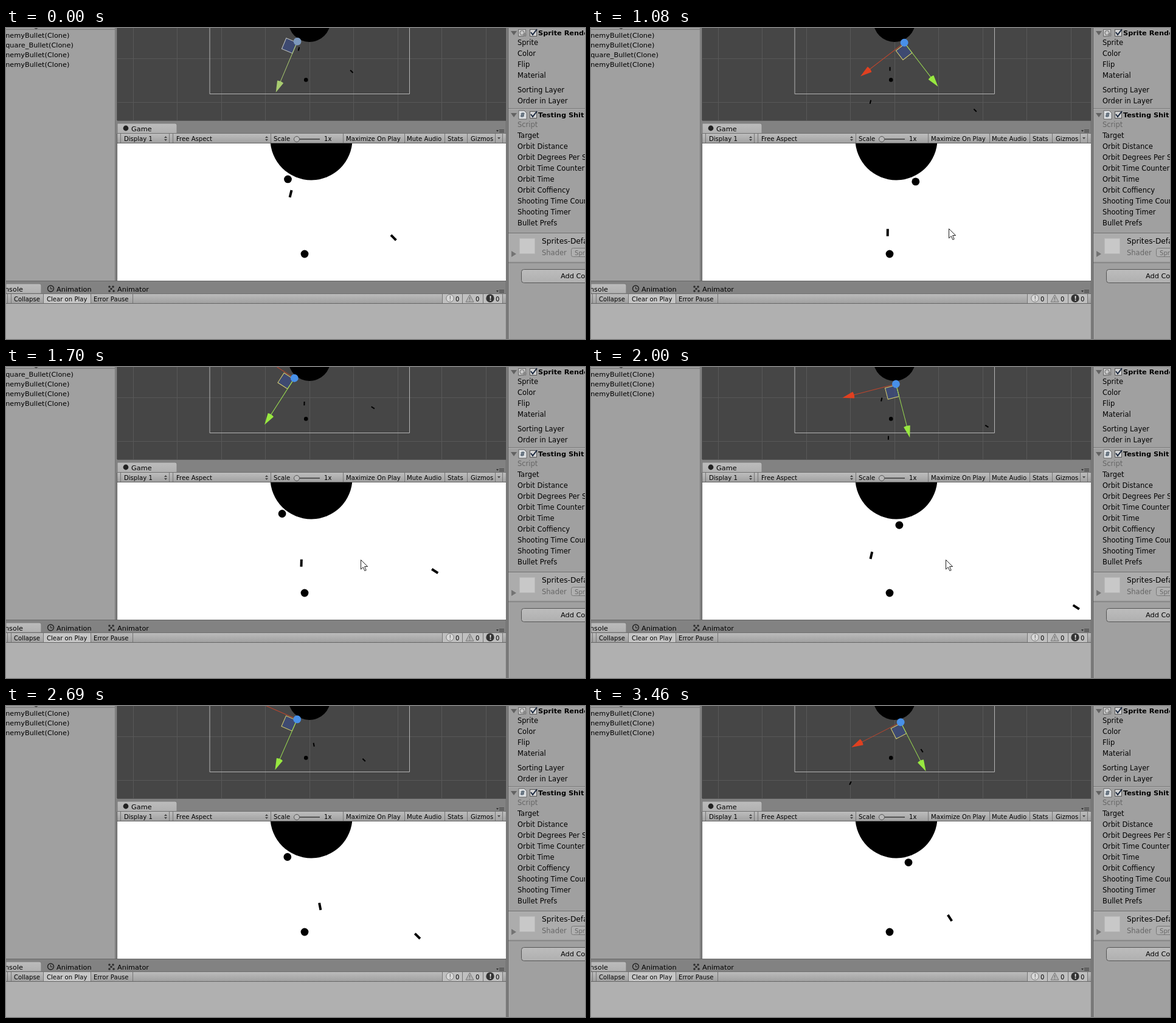
Recreate the animation shown at these times as an HTML page. Size 952 by 512 pixels, loop 3.54 s.

```html
<!DOCTYPE html>
<html lang="en">
<head>
<meta charset="utf-8">
<title>Orbit shooter in the editor</title>
<style>
  html, body { margin: 0; width: 100%; height: 100%; overflow: hidden; background: #a0a0a0; }
  svg { display: block; width: 952px; height: 512px; }
  text { font-family: "DejaVu Sans", Verdana, sans-serif; white-space: pre; }
</style>
</head>
<body>
<script>
const LOOP = 3540, HOLD = 460, TICK = 77;
const SCALE = 0.5137;              // scene view size relative to the game view
const RAD = Math.PI / 180;

// ---- drawing helpers (return SVG markup) ----
const rect = (x, y, w, h, fill, more = '') =>
  `<rect x="${x}" y="${y}" width="${w}" height="${h}" fill="${fill}" shape-rendering="crispEdges" ${more}/>`;
const vline = (x, y, h, fill = '#6a6a6a') => rect(x, y, 1, h, fill);
const hline = (x, y, w, fill = '#6a6a6a') => rect(x, y, w, 1, fill);
const path = (d, fill = 'none', more = '') => `<path d="${d}" fill="${fill}" ${more}/>`;
const disc = (x, y, r, fill = '#000', more = '') => `<circle cx="${x}" cy="${y}" r="${r}" fill="${fill}" ${more}/>`;
const label = (x, y, s, size = 11.3, more = '') => `<text x="${x}" y="${y}" font-size="${size}" ${more}>${s}</text>`;
const arrowDown = (x, y, w = 10, h = 7, fill = '#626262') => path(`M${x} ${y}h${w}l${-w / 2} ${h}z`, fill);
const spinner = x => path(`M${x} 181l2.5 -3 2.5 3zM${x} 183h5l-2.5 3z`, '#444');
const panelMenu = y => path(`M806 ${y + 1}h4l-2 3z`, '#333') +
  [0, 2, 4].map(d => hline(811, y + d, 8, '#444')).join('');
const checkbox = y => rect(861.5, y - 5.5, 11, 11, '#d2d2d2', 'stroke="#555"') +
  path(`M863 ${y - 1}l3 4 7 -9`, 'none', 'stroke="#18263c" stroke-width="2"');

function sceneView() {
  let s = rect(183, 0, 639, 152, '#464646');
  for (let i = 0; i < 9; i++) s += vline(Math.round(208.6 + i * 72.5), 0, 152, '#585858');
  s += hline(183, 50, 639, '#585858') + hline(183, 122, 639, '#585858');
  return s +
    `<g clip-path="url(#sceneClip)">
      <use href="#world" transform="translate(335 108) scale(${SCALE}) translate(-183 -416)"/>
      ${path('M335 0V108.5H663.5V0', 'none', 'stroke="#b4b4b4"')}
      <g id="gizmo">
        <g id="red">
          ${path('M0 0H-74', 'none', 'stroke="#c0452c"')}
          ${path('M-91 0l19 -5.5q2 5.5 0 11z', '#e04020')}
        </g>
        <path id="plane" d="M0 2H-19V21H0z" fill="#3c4c80" fill-opacity=".75"/>
        <path id="stem" d="M0 0V74" fill="none"/>
        <path id="cone" d="M0 91l-5.5 -19q5.5 -2 11 0z"/>
        <circle id="ball" r="6.4"/>
      </g>
    </g>`;
}

function gamePanel() {
  let s = rect(180, 152, 646, 22, '#828282') + hline(183, 152, 639, '#555');
  s += path('M183 174V157H278q3 0 3 3V174z', 'url(#tab)', 'stroke="#7c7c7c"');
  s += disc(197, 165, 4.4, '#222') + label(206, 170, 'Game');
  s += rect(183, 174, 639, 16, 'url(#bar)') + hline(183, 173, 639, '#707070') + hline(183, 189, 639, '#606060');
  for (const x of [188, 268, 274, 435, 554, 655, 721, 758, 804, 816]) s += vline(x, 174, 15, '#757575');
  s += spinner(260) + spinner(426);
  s += [[194, 'Display 1'], [280, 'Free Aspect'], [440, 'Scale'], [523, '1x'], [559, 'Maximize On Play'],
    [659, 'Mute Audio'], [726, 'Stats'], [764, 'Gizmos']].map(([x, t]) => label(x, 185.5, t, 10.1)).join('');
  s += rect(482, 182, 34, 2, '#555') + disc(478, 183, 4.5, '#b8b8b8', 'stroke="#555"');
  s += arrowDown(808, 180, 5, 3, '#444') + panelMenu(167);
  return s + rect(183, 190, 639, 226, '#fff') +
    '<g clip-path="url(#gameClip)"><use href="#world"/></g>';
}

function consolePanel() {
  let s = rect(0, 416, 826, 21, '#828282') + hline(0, 416, 822, '#666');
  s += path('M0 421H55q3 0 3 3V437H0z', 'url(#tab)', 'stroke="#7c7c7c"');
  s += label(28, 434, 'Console', 11.3, 'text-anchor="end"') + label(83, 434, 'Animation') + label(183, 434, 'Animator');
  s += disc(73.5, 429, 5, 'none', 'stroke="#222" stroke-width="1.4"') + path('M73.5 426v3.5h3', 'none', 'stroke="#222"');
  for (const [x, y] of [[170, 426], [176, 426], [173, 429.5], [170, 433], [177, 433]]) s += disc(x, y, 1.8, '#2c2c2c');
  s += panelMenu(431);
  s += rect(0, 437, 822, 17, 'url(#bar)') + hline(0, 437, 822, '#707070') + hline(0, 453, 822, '#666');
  s += rect(62, 438, 77, 15, '#c6c6c6') + rect(718, 438, 99, 15, '#c0c0c0');
  for (const x of [2, 8, 61, 139, 208, 717, 750, 784, 816]) s += vline(x, 438, 15, '#757575');
  s += [[13, 'Collapse'], [67, 'Clear on Play'], [144, 'Error Pause'], [739, '0'], [772, '0'], [805, '0']]
    .map(([x, t]) => label(x, 449.5, t, 10.1)).join('');
  s += disc(730, 445, 6.2, '#d8d8d8', 'stroke="#777"') + label(728.3, 449, '!', 10, 'fill="#555"');
  s += path('M762.5 439l6.5 12h-13z', '#b0b0b0', 'stroke="#777"') + label(761, 450, '!', 8, 'fill="#555"');
  s += disc(796, 445, 6.7, '#333') + label(794.2, 449, '!', 10, 'fill="#eee" font-weight="bold"');
  return s + rect(0, 454, 822, 58, '#b0b0b0');
}

function inspector() {
  let s = rect(822, 0, 4, 512, '#858585') + vline(822, 0, 512, '#666') + vline(825, 0, 512, '#555');
  s += rect(826, 0, 126, 512, '#a0a0a0');
  s += hline(826, 132, 126, '#777') + hline(826, 133, 126, '#b0b0b0');
  s += arrowDown(830, 5) + arrowDown(830, 140) + checkbox(8) + checkbox(143);
  s += rect(842.5, 2.5, 12, 11, '#c8c8c8', 'stroke="#666"') + disc(848.5, 8, 3.6, 'none', 'stroke="#666"') + disc(853, 11, 3, '#888');
  s += path('M843 136h9l4 4v10h-13z', '#dde0e3', 'stroke="#666"') + label(845, 147, '#', 10, 'fill="#345" font-weight="bold"');
  s += label(875, 12, 'Sprite Renderer', 11.3, 'font-weight="bold"') + label(875, 147, 'Testing Shit', 11.3, 'font-weight="bold"');
  const rows = (y, names) => names.map((n, i) => label(841, y + 18 * i, n, 11.5, n === 'Script' ? 'fill="#666"' : '')).join('');
  s += rows(28, ['Sprite', 'Color', 'Flip', 'Material']) + rows(106, ['Sorting Layer', 'Order in Layer']);
  s += rows(163, ['Script', 'Target', 'Orbit Distance', 'Orbit Degrees Per Sec', 'Orbit Time Counter', 'Orbit Time',
    'Orbit Coffiency', 'Shooting Time Counter', 'Shooting Timer', 'Bullet Prefs']);
  s += rect(826, 338, 126, 46, '#acacac') + hline(826, 337, 126, '#707070') + hline(826, 386, 126, '#777');
  s += rect(844.5, 346.5, 25, 25, '#c8c8c8', 'stroke="#b8b8b8"');
  s += path('M831 367l8 5 -8 5z', '#737373');
  s += label(881, 355, 'Sprites-Default', 12.2) + label(881, 374, 'Shader', 11.5, 'fill="#666"');
  s += `<rect x="929.5" y="362.5" width="40" height="14" rx="3" fill="#b0b0b0" stroke="#777"/>` + label(935, 373.5, 'Sprites', 10.1, 'fill="#666"');
  s += `<rect x="847.5" y="397.5" width="210" height="22" rx="4" fill="url(#tab)" stroke="#555"/>`;
  return s + label(912, 412, 'Add Component');
}

const gradient = (id, top, bottom) => `<linearGradient id="${id}" x2="0" y2="1">
  <stop stop-color="${top}"/><stop offset="1" stop-color="${bottom}"/></linearGradient>`;

document.body.innerHTML = `<svg viewBox="0 0 952 512" xmlns="http://www.w3.org/2000/svg">
  <defs>
    ${gradient('tab', '#bcbcbc', '#b0b0b0')}${gradient('bar', '#bdbdbd', '#9f9f9f')}
    <clipPath id="sceneClip"><rect x="183" width="639" height="152"/></clipPath>
    <clipPath id="gameClip"><rect x="183" y="190" width="639" height="226"/></clipPath>
    <g id="world">
      ${disc(502, 183, 67.5)}${disc(491, 372, 6.4)}
      <circle id="orbiter" r="6.4"/><path id="longShots" stroke="#000" stroke-width="4"/>
      <path id="thinShots" stroke="#000" stroke-width="1.6"/>
    </g>
  </defs>
  ${rect(0, 0, 180, 416, '#a0a0a0')}${hline(0, 2, 180, '#777')}${path('M46 0h7l-3.5 2z', '#444')}
  ${rect(180, 0, 3, 416, '#858585')}${vline(179, 0, 416, '#777')}${vline(182, 0, 416, '#555')}
  <g id="rows">${[0, 1, 2, 3, 4, 5].map(i => label(-8, 16 + 16 * i, '', 11.3)).join('')}</g>
  ${sceneView()}${gamePanel()}${consolePanel()}${inspector()}
  ${path('M.5 .5V16l3.7 -3.5 2.6 6 2.4 -1 -2.6 -6h5z', '#fff', 'id="cursor" stroke="#222"')}
</svg>`;

const $ = id => document.getElementById(id);
const rows = [...$('rows').children];

// ---- motion ----
// The orbiter swings as a triangle wave and fires at a fixed interval.
const AMPLITUDE = 47.3, HALF_PERIOD = 6.83, TROUGH = 3.635;
function swing(g) {
  const u = ((g - TROUGH) / HALF_PERIOD % 2 + 2) % 2;
  return AMPLITUDE * (2 * (u < 1 ? u : 2 - u) - 1);
}
const orbitPos = deg => [502 + 70 * Math.sin(deg * RAD), 190.5 + 70 * Math.cos(deg * RAD)];
const AIM = 10.5, LIFE = 13;

const shots = Array.from({ length: 12 }, (_, i) => {
  const at = -10.75 + 4.25 * i, deg = swing(at);
  return { at, from: orbitPos(deg), deg: deg + AIM, speed: 27.5, half: 6, path: 'longShots', name: 'EnemyBullet(Clone)' };
});
for (const at of [-8, 3.3])
  shots.push({ at, from: [491, 372], deg: 112.4, speed: 77, half: 2.7, path: 'thinShots', name: 'Square_Bullet(Clone)' });
shots.sort((a, b) => a.at - b.at);
const alive = g => shots.filter(s => g >= s.at && g < s.at + LIFE);

// tick, x, y of the pointer; hidden outside the first and last tick
const pointer = [[1, 800, 459], [2, 690, 395], [3, 592, 336], [4, 590, 334], [8, 590, 334],
  [12, 583, 317], [25, 583, 317], [27, 712, 372], [28, 786, 429], [29, 852, 471]];

function pointerAt(k) {
  const i = pointer.findIndex(p => p[0] >= k);
  if (k < 1 || i < 0) return null;
  const b = pointer[i], a = pointer[i - 1] || b, f = a === b ? 0 : (k - a[0]) / (b[0] - a[0]);
  return [1, 2].map(j => Math.round(a[j] + (b[j] - a[j]) * f));
}

function shotPath(s, g) {
  const dx = Math.sin(s.deg * RAD), dy = Math.cos(s.deg * RAD), d = (g - s.at) * s.speed + 2;
  const at = r => `${s.from[0] + dx * r} ${s.from[1] + dy * r}`;
  return `M${at(d - s.half)}L${at(d + s.half)}`;
}

function draw(t) {
  const k = t < HOLD ? 0 : 1 + Math.floor((t - HOLD + 4) / TICK);
  const g = Math.max(2.63, k - (k < 8 ? 0.18 : 0));   // the game stalls briefly at first
  const deg = swing(g), [x, y] = orbitPos(deg), live = alive(g);

  $('orbiter').setAttribute('transform', `translate(${x} ${y})`);
  for (const id of ['longShots', 'thinShots'])
    $(id).setAttribute('d', live.filter(s => s.path === id).map(s => shotPath(s, g)).join(''));

  const faded = k < 3;
  $('gizmo').setAttribute('transform',
    `translate(${335 + (x - 183) * SCALE} ${108 - (416 - y) * SCALE}) rotate(${-deg - AIM})`);
  $('red').setAttribute('visibility', faded ? 'hidden' : 'visible');
  $('plane').setAttribute('stroke', faded ? '#c4c8c4' : '#d8d070');
  $('stem').setAttribute('stroke', faded ? '#a8c870' : '#98d850');
  $('cone').setAttribute('fill', faded ? '#a8cc70' : '#98e840');
  $('ball').setAttribute('fill', faded ? '#7c98bc' : '#4890e8');

  // the hierarchy repaints slightly late
  const names = alive(g - 0.9).map(s => s.name);
  rows.forEach((row, i) => { row.textContent = names[i] || ''; });

  const p = pointerAt(k);
  $('cursor').setAttribute('visibility', p ? 'visible' : 'hidden');
  if (p) $('cursor').setAttribute('transform', `translate(${p})`);
}

const start = performance.now();
function loop() {
  draw((performance.now() - start) % LOOP);
  requestAnimationFrame(loop);
}
loop();
</script>
</body>
</html>
```
